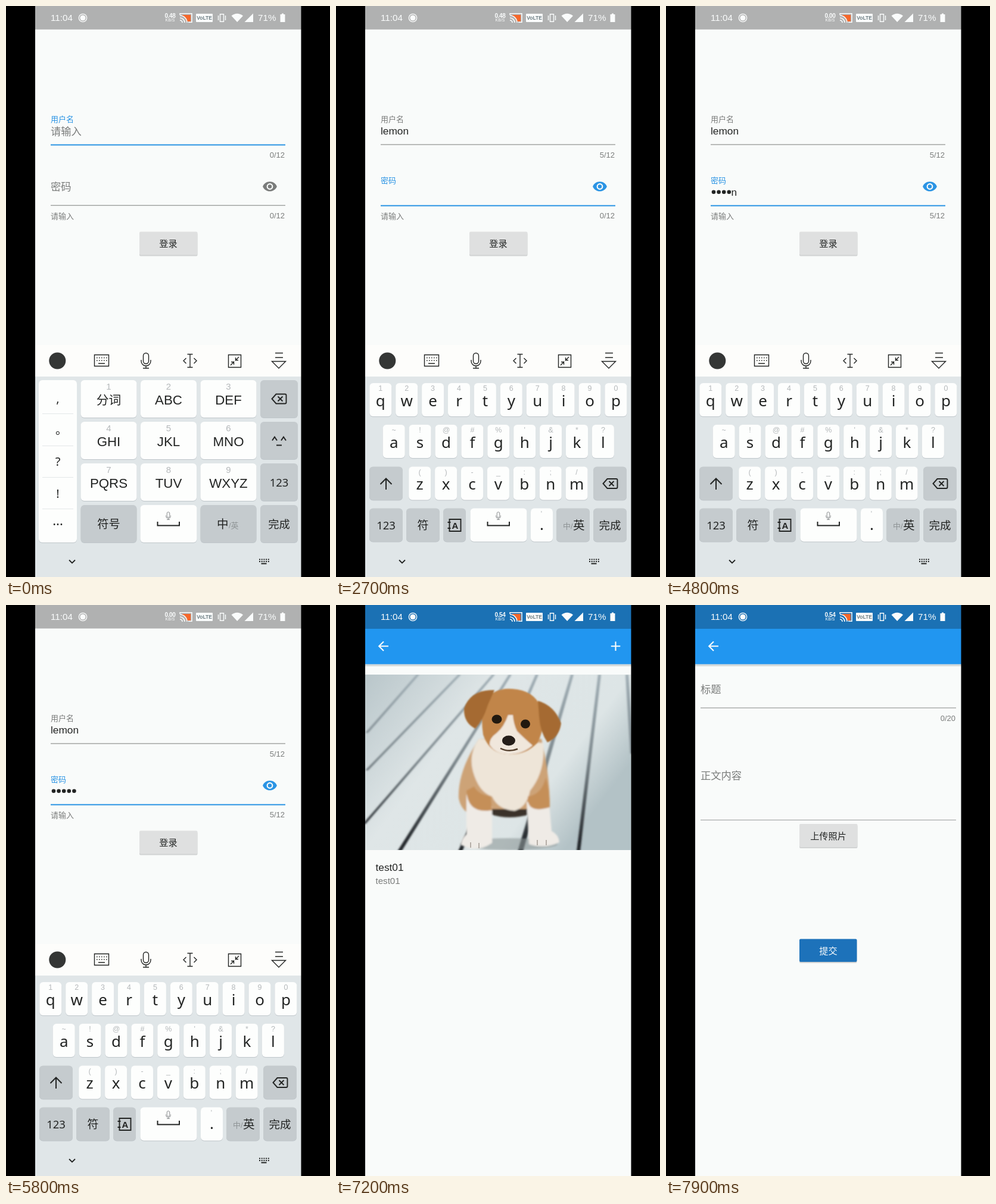
An HTML page for the animation above (8 s loop, 544x960 px).

```html
<!DOCTYPE html>
<html lang="zh">
<head>
<meta charset="utf-8">
<style>
html, body { margin: 0; width: 100%; height: 100%; overflow: hidden; background: #000 }
svg { display: block; width: 544px; height: 960px; font-family: "Liberation Sans", "Noto Sans CJK SC", sans-serif }
.key { font-family: "Noto Sans", "Noto Sans CJK SC", sans-serif }
</style>
</head>
<body>
<svg id="stage" viewBox="0 0 544 960"></svg>
<script>
const INK = '#222423', GREY = '#7a7c7b', BLUE = '#2b94e4', PAPER = '#f9fbfa', BAR = '#2196f0',
      KEY = '#fdfefd', DARK = '#c5cbce', HINT = '#b4b8ba', WHITE = '#fafcfc', BUTTON = '#dfe0e0';

const rect = (x, y, w, h, fill, r = 0, more = '') =>
  `<rect x="${x}" y="${y}" width="${w}" height="${h}" rx="${r}" fill="${fill}" ${more}/>`;
const text = (x, y, s, size, fill, anchor = 'start', more = '') =>
  `<text x="${x}" y="${y}" font-size="${size}" fill="${fill}" text-anchor="${anchor}" ${more}>${s}</text>`;
const line = (d, color = INK, w = 1.5, more = '') =>
  `<path d="${d}" fill="none" stroke="${color}" stroke-width="${w}" ${more}/>`;
const area = (d, fill, more = '') => `<path d="${d}" fill="${fill}" ${more}/>`;
const oval = (x, y, rx, ry, fill, more = '') =>
  `<ellipse cx="${x}" cy="${y}" rx="${rx}" ry="${ry}" fill="${fill}" ${more}/>`;
const group = (id, body) => `<g id="${id}">${body}</g>`;
const soft = (id, body) => `<g filter="url(#${id})">${body}</g>`;
const mid = (x, y, s, size, fill = INK) => text(x, y, s, size, fill, 'middle', 'class="key"');
const button = (x, y, w, h, fill, label, color) =>
  rect(x, y + 2, w, h, '#a9acad', 2, 'opacity=".5"') + rect(x, y, w, h, fill, 2) +
  text(272.5, y + 25.5, label, 15.2, color, 'middle');

// ---- status bar ----
function statusIcons() {
  const cast = [4, 8, 12].map(r => line(`M292 ${28 - r}a${r} ${r} 0 0 1 ${r} ${r}`, WHITE, 1.6)).join('');
  return text(75, 25, '11:04', 15.2, WHITE) +
    oval(129, 20, 6.7, 6.7, 'none', `stroke="${WHITE}" stroke-width="1.3"`) + oval(129, 20, 4.6, 4.6, WHITE) +
    text(275.5, 19.5, '', 10, WHITE, 'middle', 'id="rate" font-weight="bold" letter-spacing="-.4"') +
    text(275.5, 26, 'KB/S', 7, WHITE, 'middle') +
    area('M296 15H310V26H303Q301 18 296 17Z', '#f4682c') +
    line('M292 15V12.7H312V27.3H306', WHITE, 1.5) + cast +
    rect(319, 13, 28, 14, WHITE, 1) + text(333, 23, 'VoLTE', 8.5, '#6f7f85', 'middle', 'font-weight="bold"') +
    line('M359.5 13.7h6v12.6h-6ZM356.5 16v8M368.5 16v8', WHITE, 1.4) +
    area('M378.5 16.5Q388 9 398 16.5L388.2 27Z', WHITE) + area('M415 12.5V27H400.5Z', WHITE) +
    text(423, 25, '71%', 15.2, WHITE) + area('M463 12.5h3v1.5h2.5v13h-8v-13h2.5Z', WHITE);
}

// ---- login page ----
const eye = 'M12 4.5C7 4.5 2.7 7.6 1 12c1.7 4.4 6 7.5 11 7.5s9.3-3.1 11-7.5c-1.7-4.4-6-7.5-11-7.5z' +
  'M12 17a5 5 0 1 1 0-10a5 5 0 0 1 0 10zM12 9a3 3 0 1 0 0 6a3 3 0 0 0 0-6z';
const login = rect(49, 0, 447, 960, PAPER) + rect(49, 0, 447, 39.5, '#b0b1b1') +
  text(75, 194.5, '用户名', 13, GREY, 'start', 'id="userLabel"') +
  text(75, 216.5, '请输入', 17.3, GREY, 'start', 'id="hint"') +
  text(75, 216, '', 17.3, INK, 'start', 'id="user"') +
  rect(75, 232.5, 394, 1, GREY, 0, 'id="userLine"') +
  text(468, 255, '', 13, GREY, 'end', 'id="userCount"') +
  text(75, 310, '密码', 17.3, GREY, 'start', 'id="passLabel"') + group('dots', '') +
  text(75, 318.5, '', 17.3, INK, 'start', 'id="lastChar"') +
  rect(75, 334.7, 394, 1, GREY, 0, 'id="passLine"') +
  text(75, 357.5, '请输入', 13, GREY) + text(468, 357, '', 13, GREY, 'end', 'id="passCount"') +
  area(eye, GREY, 'id="eye" fill-rule="evenodd" transform="translate(430 290.5) scale(1.083)"') +
  button(224, 379.5, 97.5, 39, BUTTON, '登录', INK) +
  rect(0, 0, 2, 21, BLUE, 0, 'id="caret"');

// ---- other pages: the bar slides, its status strip stays at the screen top ----
const page = (id, body) => group(id, rect(49, 0, 447, 1000, PAPER) +
  rect(49, 99, 447, 4, '#b4bcc0', 0, 'opacity=".5"') + rect(49, 0, 447, 99.5, BAR) +
  rect(49, 0, 447, 40, '#1b71b4', 0, `id="${id}Strip"`) +
  line('M88 69.3H73M80 61.5L72.2 69.3L80 77', WHITE, 2.1) + body);

function photo() {
  const gaps = [[49, 278, 205, 117, 5], [45, 368, 262, 117, 5], [103, 414, 290, 117, 7], [205, 414, 335, 117, 7],
    [305, 414, 394, 117, 9], [404, 414, 440, 117, 6], [49, 215, 135, 117, 5], [494, 250, 486, 117, 6]];
  const boards = gaps.map(([x, y, u, v, w]) => area(`M${x} ${y}L${u} ${v}h5L${x + w} ${y}Z`, 'url(#gap)')).join('');
  const body = oval(290, 402, 82, 10, '#8f999a', 'opacity=".6"') +
    area('M240 225Q204 280 206 325Q210 345 226 352H358Q362 300 345 225Z', '#cda377') +
    area('M258 343H326V352Q290 362 260 352Z', '#3a322a') +
    area('M240 225Q222 250 230 280Q240 315 262 322Q272 344 300 346Q320 340 326 312Q352 280 348 232Z', '#eee5d8') +
    area('M219 318Q240 350 262 338V400Q235 418 210 403Q209 394 219 385Z', '#efebe6') +
    area('M320 330Q340 346 358 334L362 380Q374 386 375 399Q350 411 324 402Z', '#efebe6') +
    area('M219 312Q221 352 262 345L260 322Q238 318 232 305Z', '#c58f58') +
    area('M322 322Q320 352 359 340Q359 310 352 290Q346 318 322 322Z', '#c58f58');
  const head = area('M250 160Q268 138 296 141Q332 143 344 172Q353 205 338 232Q318 253 288 251Q258 250 247 218Q242 182 250 160Z', '#c18548') +
    area('M289 185Q282 205 270 215Q257 224 258 235Q268 251 290 251Q313 251 330 236Q318 226 304 212Q298 200 297 185Z', '#f0e7dc') +
    area('M266 143Q226 142 215 174Q214 198 234 208Q248 192 255 168Z', '#a56a32') +
    area('M339 161Q367 169 378 199Q375 222 355 231Q343 214 341 188Z', '#a56a32');
  return rect(49, 117, 446.5, 295, 'url(#boards)') + soft('blur2', boards) + soft('blur2', body) +
    line('M226 408v-9M240 409v-9M338 404v-9M353 404v-9', '#a39b92', 1.5) + soft('blur1', head) +
    oval(270, 192, 8.5, 7.5, '#21190f') + oval(318, 200, 8, 7.5, '#21190f') +
    oval(290, 228, 11, 8.5, '#241d19') + line('M276 241Q290 248 305 242', '#54402e', 2.5);
}

const list = page('list', line('M469.5 61.5v15.5M461.8 69.3h15.5', WHITE, 2.1) +
  `<g clip-path="url(#frame)">${photo()}</g>` +
  text(66.5, 447, 'test01', 17.3, INK) + text(66.5, 468.7, 'test01', 15.1, GREY));

const add = page('add', text(58, 147.5, '标题', 17.3, GREY) + rect(58, 172.5, 429, 1, '#858888') +
  text(486, 194.5, '0/20', 13, GREY, 'end') + text(58, 293, '正文内容', 17.3, GREY) +
  rect(58, 361, 429, 1, '#9a9c9c') + button(224, 368, 97.5, 39, BUTTON, '上传照片', INK) +
  button(224, 561.5, 96.5, 38.5, '#1d72ba', '提交', WHITE));

// ---- keyboard ----
const cap = (x, y, w, h, fill = KEY) => rect(x, y + 1, w, h, '#bfc6ca', 6) + rect(x, y, w, h, fill, 6);
const mic = (x, y, k, color, w) => `<g transform="translate(${x} ${y}) scale(${k})">` +
  line('M-4.5-8a4.5 4.5 0 0 1 9 0v9a4.5 4.5 0 0 1-9 0ZM-8-1v2a8 8 0 0 0 16 0v-2M0 9v4M-5 13h10', color, w) + '</g>';
const erase = (x, y) => line(`M${x - 12} ${y}l7-8h15q2 0 2 2v12q0 2-2 2h-15ZM${x - 2} ${y - 4}l8 8m0-8l-8 8`, INK, 1.9);
const space = (y, h) => cap(225.5, y, 95, h) + mic(272.5, 857, .5, '#8a8d8f', 2) +
  line('M254.5 867v6.5h36.5v-6.5', INK, 2);

function toolbar() {
  let keys = '';
  for (let i = 0; i < 5; i++) keys += `M${152 + i * 4} 591.5h1.6M${152 + i * 4} 596h1.6`;
  return rect(49, 570, 447, 53, '#fdfdfb') + oval(86.3, 596.5, 14, 14, '#343635') +
    line('M148.5 586.5h24v19h-24ZM155 601h11' + keys, INK, 1.4) + mic(235, 596, 1, INK, 1.4) +
    line('M304.5 585.5h9M309 585.5v22M304.5 607.5h9M302.5 592l-4.5 4.5l4.5 4.5M315.5 592l4.5 4.5l-4.5 4.5', INK, 1.4) +
    line('M373.5 586.5h21v21h-21ZM391 590l-5.5 5.5v-4.5m0 4.5h4.5M377 604l5.5-5.5v4.5m0-4.5h-4.5', INK, 1.4) +
    line('M452 583.5h13M452 591h13M446.5 597.5h23l-11.5 11.5Z', INK, 1.4);
}

function numberPad() {
  const names = ['分词', 'ABC', 'DEF', 'GHI', 'JKL', 'MNO', 'PQRS', 'TUV', 'WXYZ'];
  let s = cap(55, 629, 64, 273);
  for (const y of [685, 739, 792, 845]) s += rect(61, y, 52, 1, '#e3e7e8');
  s += mid(87, 667, ',', 20) + text(83, 720, '。', 20, INK) + mid(87, 773, '?', 20) +
    mid(87, 827, '!', 20) + mid(87, 879, '···', 22);
  names.forEach((n, i) => {
    const x = 125.5 + i % 3 * 100.5, y = 629 + (i / 3 | 0) * 70;
    s += cap(x, y, 94, 63) + text(x + 47, y + 15.5, i + 1, 15, HINT, 'middle') +
      text(x + 47, y + 41, n, i ? 22.3 : 20.8, INK, 'middle');
  });
  for (let r = 0; r < 4; r++) s += cap(427, 629 + r * 70, 63, 63, DARK);
  return s + cap(125.5, 839, 94, 63, DARK) + cap(326.5, 839, 94, 63, DARK) + space(839, 63) +
    erase(458.5, 660.5) + line('M447 730.5l4-6l4 6M462 730.5l4-6l4 6M454 738.5h9', INK, 2) +
    mid(458.5, 808, '123', 18.5) + mid(172.5, 878, '符号', 19.3) +
    text(354, 878, '中', 19.5, INK) + text(374, 877.5, '/英', 13, '#8f9496') + mid(458.5, 877.5, '完成', 18.3);
}

const rows = [['qwertyuiop', '1234567890', 74.8, 634], ['asdfghjkl', "~!@#%'&*?", 97.2, 704], ['zxcvbnm', '()-_:;/', 140.7, 774.5]];
const keyAt = {};
function letters() {
  let s = '';
  for (const [chars, hints, x0, y] of rows) [...chars].forEach((c, i) => {
    const x = x0 + i * 43.9;
    keyAt[c] = [x, y];
    s += cap(x - 18.5, y, 37, 56) + text(x, y + 13, hints[i].replace('&', '&amp;'), 12.5, HINT, 'middle') + mid(x, y + 38.5, c, 26);
  });
  s += cap(56, 774.5, 56, 56, DARK) + cap(432, 774.5, 56, 56, DARK);
  for (const [x, w] of [[56, 56], [118, 56], [180, 38], [370, 56], [432, 56]]) s += cap(x, 844.5, w, 56, DARK);
  return s + space(844.5, 56) + cap(327, 844.5, 37, 56) + text(345, 858, "'", 12, HINT, 'middle') + mid(345.5, 881, '.', 26) +
    line('M84 813v-18M74.5 804l9.5-9.5l9.5 9.5', INK, 2) + erase(460.5, 803) +
    mid(84, 880, '123', 18.5) + mid(146, 880, '符', 19) + line('M190.5 863h19v20h-19ZM187.5 868h5M187.5 878h5', INK, 1.9) +
    text(200, 878.5, 'A', 15, INK, 'middle', 'font-weight="bold"') +
    text(381, 879, '中/', 13, '#8f9496') + text(398, 880, '英', 19.5, INK) + mid(460, 880, '完成', 18.5);
}

function navBar() {
  let d = '';
  for (let r = 0; r < 2; r++) for (let i = 0; i < 5; i++) d += `M${425 + i * 3.7} ${930.5 + r * 3.5}h2`;
  return line('M106 931.5l5 5l5-5', INK, 1.8) + line(d + 'M428.5 937.5h9', INK, 2);
}

const popup = rect(-33, 1, 66, 65, '#cdd3d6', 6) + rect(-33, 0, 66, 64, KEY, 6) +
  text(0, 43.5, '', 31, '#3b96e4', 'middle', 'id="popChar" class="key"');

document.getElementById('stage').innerHTML = `<defs>
  <clipPath id="frame"><rect x="49" y="117" width="447" height="295"/></clipPath>
  <filter id="blur1"><feGaussianBlur stdDeviation=".8"/></filter>
  <filter id="blur2"><feGaussianBlur stdDeviation="1.4"/></filter>
  <linearGradient id="boards" x1="0" y1="0" x2="1" y2=".5"><stop stop-color="#b9c6ca"/><stop offset=".4" stop-color="#dfe6e7"/>
    <stop offset=".8" stop-color="#dde5e6"/><stop offset="1" stop-color="#b3c2c6"/></linearGradient>
  <linearGradient id="gap" gradientUnits="userSpaceOnUse" x1="0" y1="117" x2="0" y2="400"><stop stop-color="#9fadb4"/>
    <stop offset=".5" stop-color="#7d888d"/><stop offset="1" stop-color="#22262a"/></linearGradient></defs>` +
  group('login', login) + list + add +
  group('board', rect(49, 622, 447, 420, '#e0e6e8') + toolbar() + group('pad', numberPad()) +
    group('abc', letters()) + navBar() + group('pop', popup)) +
  statusIcons() +
  group('ring', oval(0, 0, 12, 12, '#fff', 'fill-opacity=".5" stroke="#9a9c9c" stroke-width="1.4"')) +
  rect(0, 0, 49, 960, '#000') + rect(495.5, 0, 49, 960, '#000');

// ---- motion ----
const el = {};
document.querySelectorAll('[id]').forEach(e => el[e.id] = e);
const set = (id, props) => { for (const k in props) el[id].setAttribute(k, props[k]); };
const clamp = v => Math.min(1, Math.max(0, v));

const HOLD = 100, NAME = 'lemon', PASS = 'satin';
const nameTimes = [580, 820, 1060, 1300, 1540], passTimes = [2790, 3030, 3270, 3510, 3750];
const times = [...nameTimes, ...passTimes];
const strokes = [...NAME + PASS].map((c, i) => ({ at: times[i], c }));
const SWITCH = 300, FOCUS = 2150, OPEN = 5900, ADD = 7500;
const taps = [[SWITCH - HOLD, 372, 872], [FOCUS - HOLD, 200, 304], [5540, 272, 400], [ADD - 150, 469, 69],
  ...strokes.map(({ at, c }) => [at, keyAt[c][0] + (c === 'n' ? -6.5 : 1), keyAt[c][1] + 28])];

const typed = (starts, t) => starts.filter(a => t >= a + HOLD).length;

function slideIn(id, t) {
  const y = 76 * (1 - clamp(t / 350)) ** 4;
  set(id, { opacity: clamp(t / 200), transform: `translate(0 ${y})` });
  set(id + 'Strip', { height: Math.max(0, 40 - y) });
}

function draw(t) {
  const onUser = t < FOCUS, onPass = !onUser && t < OPEN;
  const n = typed(nameTimes, t), p = typed(passTimes, t);
  const last = Math.max(...[-750, FOCUS, ...times.map(a => a + HOLD)].filter(a => a <= t));

  el.user.textContent = NAME.slice(0, n);
  el.userCount.textContent = n + '/12';
  el.passCount.textContent = p + '/12';
  set('hint', { opacity: n ? 0 : 1 });
  set('userLabel', { fill: onUser ? BLUE : GREY });
  set('userLine', { fill: onUser ? BLUE : GREY, height: onUser ? 2 : 1 });
  set('passLine', { fill: onPass ? BLUE : GREY, height: onPass ? 2 : 1 });
  set('eye', { fill: onPass ? BLUE : GREY });
  const lift = clamp((t - FOCUS) / 170);
  set('passLabel', { y: 310 - 12.5 * lift, 'font-size': 17.3 - 4.3 * lift, fill: onPass ? BLUE : GREY });

  // the newest password letter stays readable for a moment
  const shown = p && t - last < 1500 ? 1 : 0;
  const dots = p - shown;
  el.dots.innerHTML = Array.from({ length: dots }, (_, i) => oval(80 + i * 8.6, 312.7, 3.3, 3.3, INK)).join('');
  el.lastChar.textContent = shown ? PASS[p - 1] : '';
  set('lastChar', { x: 75 + dots * 8.6 });

  const width = onUser ? el.user.getComputedTextLength() : dots * 8.6 + el.lastChar.getComputedTextLength();
  set('caret', { x: 75 + width, y: onUser ? 199 : 301.5, opacity: t < OPEN && Math.floor((t - last) / 500) % 2 === 0 ? 1 : 0 });

  el.rate.textContent = t < 2900 ? '0.48' : t < OPEN ? '0.00' : '0.54';

  set('pad', { visibility: t < SWITCH ? 'visible' : 'hidden' });
  set('abc', { visibility: t < SWITCH ? 'hidden' : 'visible' });
  const hide = clamp((t - OPEN) / 130);
  set('board', { opacity: 1 - hide, transform: `translate(0 ${80 * hide})` });
  const press = strokes.find(s => t >= s.at && t < s.at + HOLD);
  set('pop', { opacity: press ? 1 : 0 });
  if (press) {
    const [x, y] = keyAt[press.c];
    el.popChar.textContent = press.c;
    set('pop', { transform: `translate(${Math.min(462, Math.max(82, x))} ${y - 89.5})` });
  }

  const tap = taps.find(([a]) => t >= a && t < a + 240);
  set('ring', { opacity: tap ? clamp(1 - (t - tap[0] - HOLD) / 140) : 0 });
  if (tap) set('ring', { transform: `translate(${tap[1]} ${tap[2]})` });

  slideIn('list', t - OPEN);
  slideIn('add', t - ADD);
}

const start = performance.now();
function tick() {
  draw((performance.now() - start) % 8000);
  requestAnimationFrame(tick);
}
tick();
</script>
</body>
</html>
```
